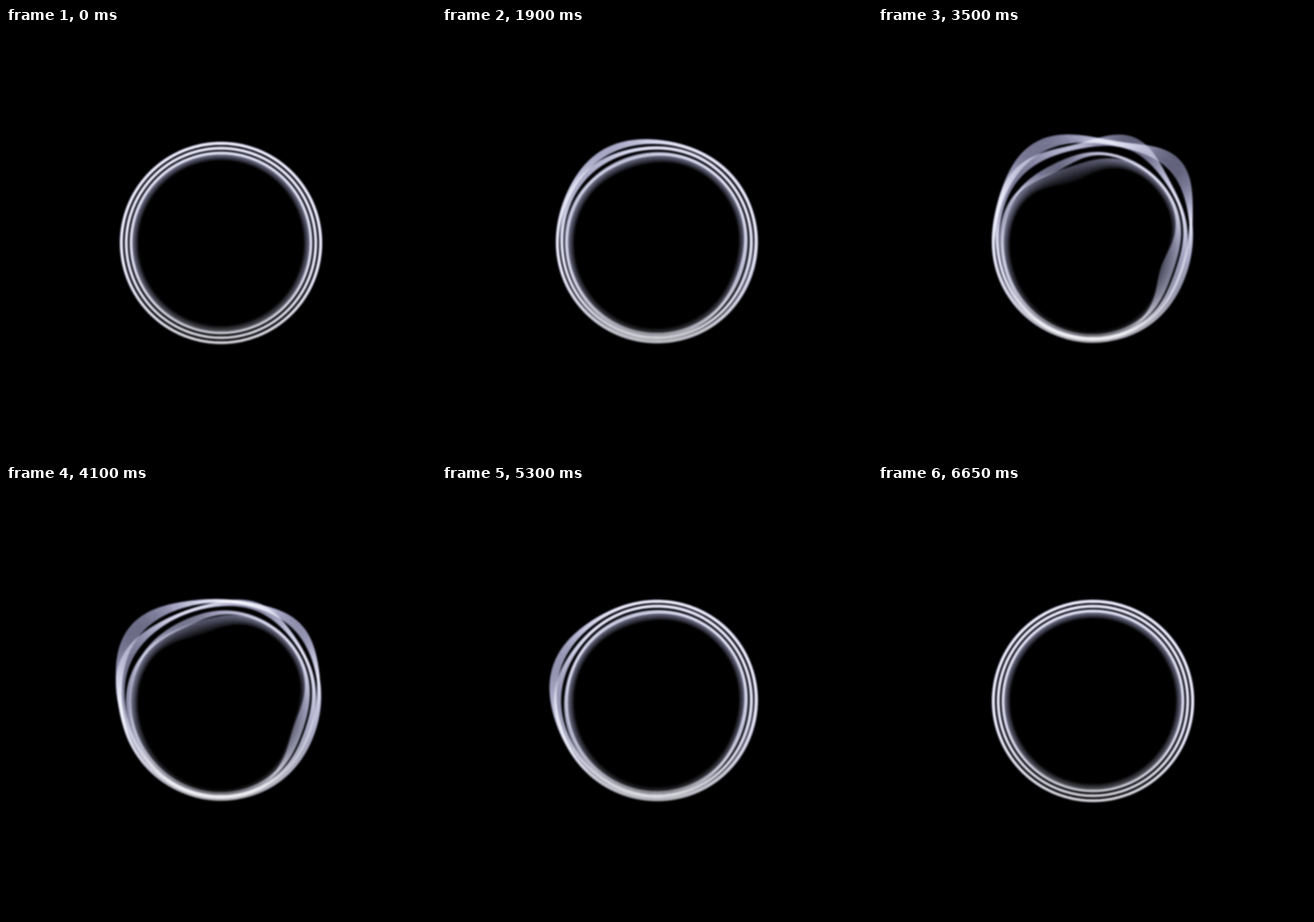
Write an HTML page with a canvas that moves like this. It is 640 px wide and 640 px high and loops after 6700 ms.

```html
<!DOCTYPE html>
<html lang="en">
<head>
<meta charset="utf-8">
<title>Pulsing ring</title>
<style>
  html, body { margin: 0; width: 100%; height: 100%; overflow: hidden; background: #000; }
  canvas { display: block; width: 640px; height: 640px; filter: blur(.9px); }
</style>
</head>
<body>
<canvas id="stage" width="640" height="640"></canvas>
<script>
const ctx = document.getElementById('stage').getContext('2d');
const LOOP = 6700, STEP = 50, POINTS = 240, SETTLE = 143;

// Each ring is a bundle of fine strands that fans out where it is pushed.
// Shares: how strongly it follows the swell, crest, sink and dent.
const line = { half: 1.6, strands: 13, spread: .3, width: 2.2 };
const rings = [
  { ...line, radius: 148.3, swell: 1, crest: 1, sink: 0, dent: .35, light: () => 1 },
  { ...line, radius: 141, swell: .75, crest: .9, sink: 0, dent: .35, light: () => .9 },
  { ...line, radius: 134, swell: .2, crest: .4, sink: .65, dent: .9, light: () => .62 },
  { radius: 129, half: 5.5, strands: 20, spread: .2, width: 2.6,
    swell: 0, crest: 0, sink: 1, dent: .6, light: u => .05 + .42 * (u + 1) / 2 }
];

const keys = [
  { time: 0, swell: 0, angle: 280, dip: 0 },
  { time: 450, swell: 18, angle: 280, dip: 2 },
  { time: 1000, swell: 17, angle: 275, dip: 3 },
  { time: 1900, swell: 10, angle: 240, dip: 5 },
  { time: 2800, swell: 10, angle: 198, dip: 9 },
  { time: 3500, swell: 22, angle: 240, dip: 28 },
  { time: 4600, swell: 26, angle: 203, dip: 14 },
  { time: 5300, swell: 13, angle: 199, dip: 4 },
  { time: 6250, swell: 0, angle: 199, dip: 0 },
  { time: LOOP, swell: 0, angle: 199, dip: 0 }
];

const paint = ctx.createLinearGradient(0, 170, 0, 470);
paint.addColorStop(0, 'rgb(82,82,106)');
paint.addColorStop(.6, 'rgb(78,78,100)');
paint.addColorStop(1, 'rgb(54,54,57)');

const smooth = x => x * x * (3 - 2 * x);

function poseAt(time) {
  const next = keys.findIndex(key => key.time > time);
  const from = keys[next - 1], to = keys[next];
  const mix = smooth((time - from.time) / (to.time - from.time));
  const blend = name => from[name] + (to[name] - from[name]) * mix;
  return { swell: blend('swell'), angle: blend('angle'), dip: blend('dip') };
}

function bump(angle, center, width) {
  const gap = (angle - center + 540) % 360 - 180;
  return Math.exp(-((gap / width) ** 2));
}

// Outer rings swell outward, inner ones sink, and all gather at the bottom.
function pushAt(ring, depth, pose, angle) {
  const { swell, dip } = pose;
  const gather = Math.min(1, swell / 22) * (SETTLE - ring.radius);
  return swell * ring.swell * bump(angle, pose.angle - 18 * depth, 28)
    + dip * dip / 28 * ring.crest * bump(angle, 316 - 25 * depth, 22)
    - dip * ring.sink * bump(angle, 252, 30)
    - dip * ring.dent * bump(angle, 20, 27)
    + gather * bump(angle, 95, 50);
}

function drawRing(ring, depth, pose) {
  const pushes = Array.from({ length: POINTS },
    (_, i) => pushAt(ring, depth, pose, i * 360 / POINTS));
  ctx.lineWidth = ring.width;
  for (let s = 0; s < ring.strands; s++) {
    const u = 2 * s / (ring.strands - 1) - 1;
    ctx.globalAlpha = ring.light(u);
    ctx.beginPath();
    pushes.forEach((push, i) => {
      const share = 1 + ring.spread * (u * Math.sign(push) - 1);
      const r = ring.radius + u * ring.half + push * share;
      const a = i * 2 * Math.PI / POINTS;
      ctx.lineTo(320 + r * Math.cos(a), 320 + r * Math.sin(a));
    });
    ctx.closePath();
    ctx.stroke();
  }
}

function draw(time) {
  ctx.globalCompositeOperation = 'source-over';
  ctx.globalAlpha = 1;
  ctx.fillStyle = '#000';
  ctx.fillRect(0, 0, 640, 640);
  ctx.globalCompositeOperation = 'screen';
  ctx.strokeStyle = paint;
  const pose = poseAt(time);
  rings.forEach((ring, depth) => drawRing(ring, depth, pose));
}

const start = performance.now();
function tick() {
  const time = (performance.now() - start) % LOOP;
  draw(Math.floor(time / STEP) * STEP);
  requestAnimationFrame(tick);
}
tick();
</script>
</body>
</html>
```
